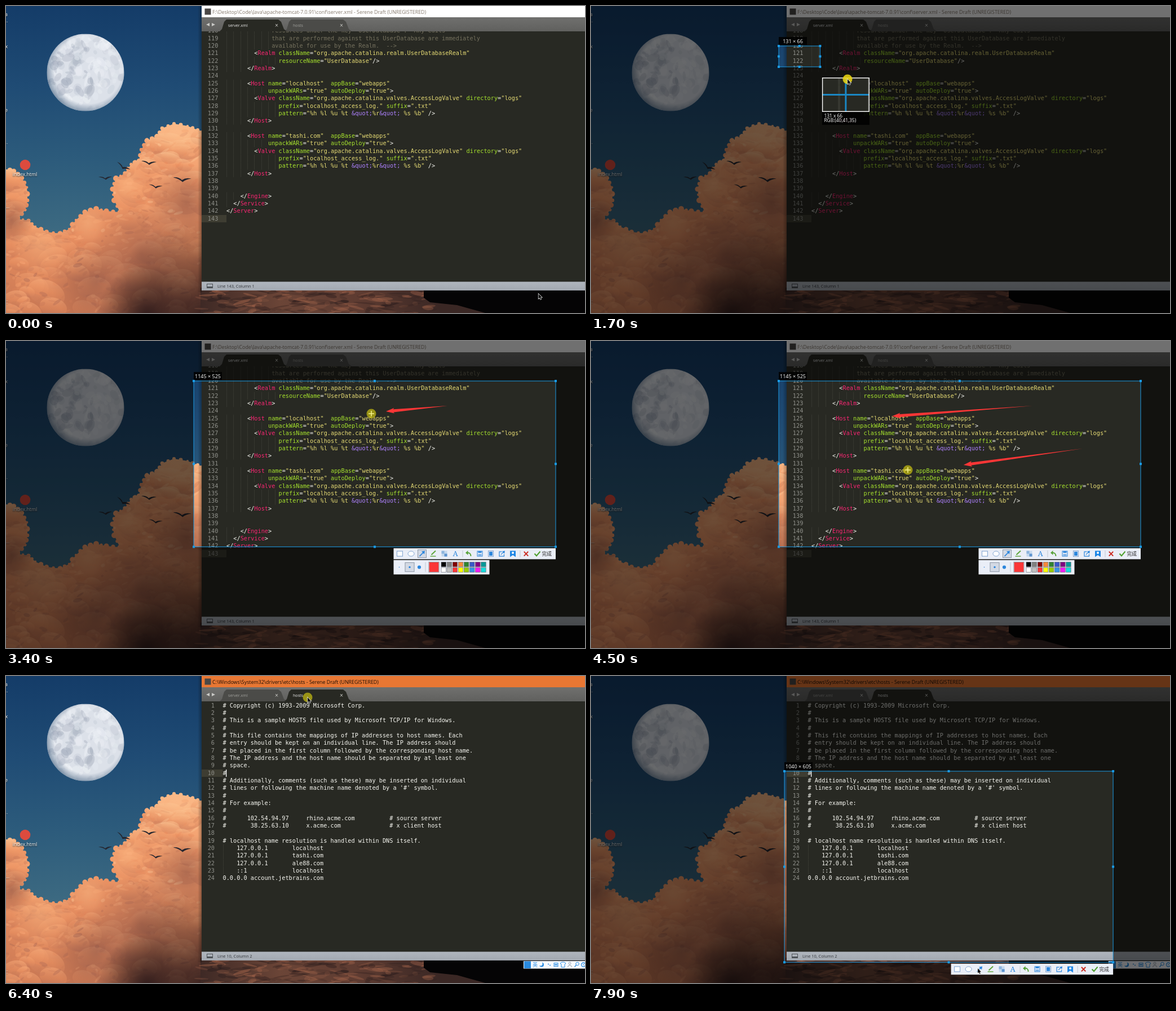
These frames come from a looping animation (1027x545 px, 8 s). An HTML page with a canvas:

```html
<!DOCTYPE html>
<html lang="en">
<head>
<meta charset="utf-8">
<title>Screen capture demo</title>
<style>
html, body { margin: 0; width: 100%; height: 100%; overflow: hidden; background: #000; }
canvas { display: block; width: 100%; height: 100%; }
</style>
</head>
<body>
<canvas id="stage" width="1027" height="545"></canvas>
<script>
const W = 1027, H = 545, LOOP = 8000, STEP = 100, SCALE = 0.5607;
const UI = '"Open Sans", "Noto Sans CJK SC", "Noto Sans CJK", sans-serif';
const MONO = '"DejaVu Sans Mono", "Noto Sans Mono", monospace';
const CW = 6.168, LH = 13.33, CODE = 10.245, BLUE = '#1a9be6', RED = '#fb3636';
const stage = document.getElementById('stage').getContext('2d');

let seed = 7;
const rnd = (a = 0, b = 1) => {
  seed = (seed * 16807) % 2147483647;
  return a + (b - a) * seed / 2147483647;
};

function rect(g, x, y, w, h, c) { g.fillStyle = c; g.fillRect(x, y, w, h); }
function box(g, x, y, w, h, c, lw = 1) { g.strokeStyle = c; g.lineWidth = lw; g.strokeRect(x, y, w, h); }
function disc(g, x, y, r, c) { g.fillStyle = c; g.beginPath(); g.arc(x, y, r, 0, 7); g.fill(); }
function blob(g, x, y, rx, ry, turn, c) {
  g.fillStyle = c;
  g.beginPath(); g.ellipse(x, y, rx, ry, turn, 0, 7); g.fill();
}
function trace(g, pts) {
  g.beginPath();
  for (let i = 0; i < pts.length; i += 2) g.lineTo(pts[i], pts[i + 1]);
}
function poly(g, pts, c) { trace(g, pts); g.closePath(); g.fillStyle = c; g.fill(); }
function line(g, pts, c, lw = 1) { trace(g, pts); g.strokeStyle = c; g.lineWidth = lw; g.stroke(); }
function text(g, s, x, y, size, c, font = UI, align = 'left') {
  g.font = size + 'px ' + font;
  g.textAlign = align;
  g.fillStyle = c;
  g.fillText(s, x, y);
}
function stops(grad, list) {
  list.forEach((c, i) => grad.addColorStop(i / (list.length - 1), c));
  return grad;
}
const ramp = (g, x0, y0, x1, y1, ...list) => stops(g.createLinearGradient(x0, y0, x1, y1), list);
function glow(g, x, y, r, rgb, a) {
  disc(g, x, y, r, stops(g.createRadialGradient(x, y, 0, x, y, r), [`rgba(${rgb},${a})`, `rgba(${rgb},${a / 2})`, `rgba(${rgb},0)`]));
}
function sheet() {
  const c = document.createElement('canvas');
  c.width = W; c.height = H;
  return c.getContext('2d', { willReadFrequently: true });
}

/* ---------- desktop ---------- */
function moon(g) {
  const x = 141, y = 118, r = 68.5;
  g.save();
  g.beginPath(); g.arc(x, y, r, 0, 7); g.clip();
  rect(g, x - r, y - r, 2 * r, 2 * r, '#dce1e9');
  for (let i = 0; i < 150; i++) {
    const a = rnd(0, 6.28), d = r * Math.sqrt(rnd());
    const px = x + d * Math.cos(a), py = y + d * Math.sin(a);
    const sea = px < x + 12 && py < y + 35 && py > y - 48;
    g.globalAlpha = rnd(0.15, 0.45);
    const c = sea && rnd() < 0.72 ? '#9fa8b8' : rnd() < 0.7 ? '#f0f3f7' : '#bfc6d1';
    blob(g, px, py, rnd(2, 12), rnd(2, 8), rnd(0, 3), c);
  }
  g.globalAlpha = 1;
  const edge = g.createRadialGradient(x + 5, y - 5, r - 8, x + 5, y - 5, r + 9);
  rect(g, x - r, y - r, 2 * r, 2 * r, stops(edge, ['rgba(90,112,140,0)', 'rgba(70,100,130,.7)']));
  g.restore();
}

const outlines = [
  [0, 290, 14, 293, 28, 305, 37, 322, 38, 345, 34, 362, 22, 376, 0, 382],
  [0, 374, 20, 378, 40, 381, 52, 392, 72, 401, 96, 404, 112, 396, 124, 380, 140, 366, 160, 360, 178, 364, 202, 366,
    192, 345, 189, 325, 195, 306, 211, 297, 222, 281, 236, 275, 240, 255, 250, 239, 268, 232, 277, 217, 298, 209,
    322, 213, 340, 220, 360, 225, 360, 545, 0, 545]
];

function clouds(g) {
  const p = new Path2D();
  for (const o of outlines) {
    p.moveTo(o[0], o[1]);
    for (let i = 2; i < o.length; i += 2) p.lineTo(o[i], o[i + 1]);
    p.closePath();
    for (let i = 2; i < o.length; i += 2) for (const k of [0, 0.5]) {
      const x = o[i] + (o[i - 2] - o[i]) * k, y = o[i + 1] + (o[i - 1] - o[i + 1]) * k, r = rnd(2, 5);
      p.moveTo(x + r, y);
      p.arc(x, y, r, 0, 7);
    }
  }
  g.save();
  g.clip(p);
  rect(g, 0, 200, 360, 345, ramp(g, 0, 210, 0, 545, '#fab685', '#f09a69', '#e28a5e', '#c87753'));
  for (let i = 0; i < 150; i++) {
    const y = 215 + i * 2.25, x = rnd(-10, 360), r = rnd(10, 28);
    g.globalAlpha = rnd(0.25, 0.55);
    const c = ramp(g, x + r * 0.3, y - r, x, y + r, y < 310 ? '#ffd3a2' : '#fbb07e', '#ec9362', '#bd7257');
    blob(g, x, y, r * 1.25, r * 0.85, rnd(-0.5, 0.5), c);
  }
  const tones = ['#ffcd9d', '#f9aa78', '#e98b5d', '#c97a58', '#ad6a55'];
  for (let i = 0; i < 700; i++) {
    const y = rnd(210, 545);
    g.globalAlpha = rnd(0.15, 0.45);
    blob(g, rnd(0, 350), y, rnd(2, 9), rnd(1, 3.5), rnd(-0.9, 0.5),
      tones[Math.min(4, Math.floor(rnd(0, 3.4) + (y - 210) / 230))]);
  }
  g.globalAlpha = 1;
  for (const [x, y, r] of [[320, 350, 70], [240, 440, 90], [160, 490, 80], [10, 380, 40]]) glow(g, x, y, r, '120,70,62', 0.5);
  for (const [x, y, r] of [[305, 230, 50], [215, 320, 35], [60, 425, 50], [145, 385, 35]]) glow(g, x, y, r, '255,196,142', 0.35);
  for (const [x, y, r] of [[350, 545, 170], [250, 550, 90]]) glow(g, x, y, r, '38,22,24', 0.9);
  g.restore();
}

function bird(g, x, y, s, tilt) {
  g.save();
  g.translate(x, y); g.rotate(tilt); g.scale(s, s);
  g.fillStyle = '#25262f';
  g.beginPath();
  g.moveTo(-13, -4);
  g.quadraticCurveTo(-5, -5, 0, 0);
  g.quadraticCurveTo(6, -4, 14, -2);
  g.quadraticCurveTo(6, -1, 1, 3);
  g.quadraticCurveTo(-4, -2, -13, -4);
  g.fill();
  g.restore();
}

function desktop(g) {
  rect(g, 0, 0, W, H, ramp(g, 0, 0, 0, 420, '#143c68', '#1f4b74', '#2d5c7c', '#3f6c82'));
  moon(g);
  clouds(g);
  [[176, 306, 0.9, -0.1], [207, 286, 1, 0.45], [253, 279, 1, 0], [265, 321, 0.9, 0.05], [312, 309, 1.2, 0]]
    .forEach(b => bird(g, ...b));
  rect(g, 345, 500, 682, 45, ramp(g, 345, 0, 770, 0, '#3e2925', '#6b4537', '#5d3b31', '#3a2724'));
  for (let i = 0; i < 160; i++) {
    g.globalAlpha = rnd(0.15, 0.45);
    blob(g, rnd(345, 760), rnd(505, 545), rnd(4, 20), rnd(1, 4), rnd(-0.3, 0.3), rnd() < 0.55 ? '#a9684d' : '#2a1c1c');
  }
  g.globalAlpha = 1;
  poly(g, [741, 505, 1027, 505, 1027, 545, 850, 545, 800, 531, 752, 526, 741, 518], '#050405');
  disc(g, 34, 282, 9.3, '#dd4b3e');
  g.shadowColor = '#000'; g.shadowBlur = 2; g.shadowOffsetY = 1;
  text(g, 'index.html', 33.5, 302, 8.8, '#fff', UI, 'center');
  [['a', 18], ['..', 29], ['x', 75], ['e', 188], ['..', 245], ['...', 359], [':', 528]]
    .forEach(([s, y]) => text(g, s, s === '...' ? 6 : 3, y, 8.8, '#fff', UI, 'right'));
  g.shadowColor = 'transparent'; g.shadowBlur = g.shadowOffsetY = 0;
}

/* ---------- editor ---------- */
const valve = [
  '        <Valve className="org.apache.catalina.valves.AccessLogValve" directory="logs"',
  '               prefix="localhost_access_log." suffix=".txt"',
  '               pattern="%h %l %u %t &quot;%r&quot; %s %b" />',
  '      </Host>'
];
const host = name => [
  `      <Host name="${name}"  appBase="webapps"`,
  '            unpackWARs="true" autoDeploy="true">', ...valve
];
const xml = [
  '             resources under the key "UserDatabase".  Any edits',
  '             that are performed against this UserDatabase are immediately',
  '             available for use by the Realm.  -->',
  '        <Realm className="org.apache.catalina.realm.UserDatabaseRealm"',
  '               resourceName="UserDatabase"/>',
  '      </Realm>', '', ...host('localhost'), '', ...host('tashi.com'), '', '',
  '    </Engine>', '  </Service>', '</Server>', ''
];
const hosts = `# Copyright (c) 1993-2009 Microsoft Corp.
#
# This is a sample HOSTS file used by Microsoft TCP/IP for Windows.
#
# This file contains the mappings of IP addresses to host names. Each
# entry should be kept on an individual line. The IP address should
# be placed in the first column followed by the corresponding host name.
# The IP address and the host name should be separated by at least one
# space.
#
# Additionally, comments (such as these) may be inserted on individual
# lines or following the machine name denoted by a '#' symbol.
#
# For example:
#
#      102.54.94.97     rhino.acme.com          # source server
#       38.25.63.10     x.acme.com              # x client host

# localhost name resolution is handled within DNS itself.
    127.0.0.1       localhost
    127.0.0.1       tashi.com
    127.0.0.1       ale88.com
    ::1             localhost
0.0.0.0 account.jetbrains.com`.split('\n');

function tokens(src) {
  const out = [];
  let tag = false;
  for (const m of src.matchAll(/"[^"]*"|<\/?|\/?>|=|\w+/g)) {
    const s = m[0];
    if (s[0] === '"') {
      let at = m.index;
      for (const part of s.split(/(&quot;)/)) {
        out.push([part, at, part[0] === '&' ? '#ae81ff' : '#e6db74']);
        at += part.length;
      }
    } else {
      const word = /\w/.test(s);
      out.push([s, m.index, !word ? '#f8f8f2' : tag ? '#f92672' : '#a6e22e']);
    }
    tag = s[0] === '<';
  }
  return out;
}

function code(g, rows, o) {
  rows.forEach((row, i) => {
    const y = o.y + i * LH, n = o.first + i;
    if (n === o.current) rect(g, 347, Math.round(y - 10), o.x - 347, 13, '#3e3d32');
    text(g, n, o.num, y, CODE, '#90918b', MONO, 'right');
    const indent = row.search(/\S/);
    for (let c = 0; c < indent; c += o.tab) rect(g, Math.round(o.x + c * CW), y - 10, 1, LH, '#363730');
    const list = !o.xml ? [[row, 0, '#f8f8f2']] : i < 3 ? [[row.trim(), indent, '#75715e']] : tokens(row);
    for (const [s, col, c] of list) text(g, s, o.x + col * CW, y, CODE, c, MONO);
  });
}

function tab(g, x, name, on) {
  poly(g, [x, 45, x + 4, 41, x + 8, 28, x + 12, 24, x + 104, 24, x + 109, 28, x + 114, 41, x + 119, 45],
    on ? '#282923' : '#4b4b48');
  text(g, name, x + 15, 37, 7.1, on ? '#f0f0f0' : '#a2a29e');
  const c = x + 101;
  line(g, [c - 2, 32, c + 2, 36.5], '#c8c8c4');
  line(g, [c + 2, 32, c - 2, 36.5], '#c8c8c4');
}

function editor(g, isHosts) {
  rect(g, 340, 0, 7, 508, ramp(g, 340, 0, 347, 0, 'rgba(0,0,0,0)', 'rgba(0,0,0,.3)'));
  rect(g, 347, 0, 680, 505, '#282923');
  g.save();
  g.beginPath(); g.rect(347, 45, 680, 444); g.clip();
  if (isHosts) {
    code(g, hosts, { x: 384.5, y: 55.6, num: 370, first: 1, current: 10, tab: 4 });
    rect(g, 390, 166, 1.3, 13, '#fff');
  } else {
    code(g, xml, { x: 391, y: 47.3, num: 376.3, first: 118, current: 143, tab: 2, xml: true });
  }
  g.restore();
  rect(g, 347, 0, 680, 20, isHosts ? '#e87733' : '#fff');
  rect(g, 352.5, 4.5, 11, 11, '#4b4846');
  const path = isHosts ? 'C:\\Windows\\System32\\drivers\\etc\\hosts'
    : 'F:\\Desktop\\Code\\Java\\apache-tomcat-7.0.91\\conf\\server.xml';
  text(g, path + ' - Serene Draft (UNREGISTERED)', 366, 13.5, 8.84, isHosts ? '#1c0d04' : '#85796d');
  rect(g, 347, 20, 680, 25, ramp(g, 0, 20, 0, 45, '#70706e', '#60605e'));
  poly(g, [361, 30, 361, 36, 355, 33], '#c9c9c6');
  poly(g, [365, 30, 365, 36, 371, 33], '#c9c9c6');
  tab(g, isHosts ? 379 : 494, isHosts ? 'server.xml' : 'hosts', false);
  tab(g, isHosts ? 494 : 379, isHosts ? 'hosts' : 'server.xml', true);
  rect(g, 347, 489.5, 680, 15.5, ramp(g, 0, 489, 0, 505, '#b0b6be', '#a2a8b0'));
  box(g, 356.5, 493.5, 10, 7, '#4d5257');
  rect(g, 357, 498, 9, 2, '#4d5257');
  text(g, isHosts ? 'Line 10, Column 2' : 'Line 143, Column 1', 375, 500, 7.4, '#33373b');
}

function inputBar(g) {
  const c = '#2a8be0', y = 512.5;
  rect(g, 918, 506, 109, 13.5, '#f6faff');
  rect(g, 919, 506.5, 12, 12.5, c);
  text(g, '英', 934, 516, 9, c);
  disc(g, 950, y, 4, c);
  disc(g, 948, y - 1.5, 3.6, '#f6faff');
  disc(g, 962, y - 1, 1, c); disc(g, 965, y + 1, 1, c);
  box(g, 972, y - 3, 7, 6, c);
  line(g, [973, y, 978, y], c, 2);
  line(g, [983, 510, 986, 508, 990, 508, 993, 510, 991, 512, 991, 517, 985, 517, 985, 512, 983, 510], c);
  g.strokeStyle = '#98a2ae';
  g.beginPath(); g.arc(1000, 510, 2, 0, 7); g.stroke();
  g.beginPath(); g.arc(1000, 517, 3.5, 3.14, 6.28); g.stroke();
  g.strokeStyle = c;
  g.beginPath(); g.arc(1013.5, 511, 2.8, 0, 7); g.stroke();
  line(g, [1011.5, 513, 1008.5, 516.5], c, 1.3);
  g.beginPath(); g.arc(1024, y, 3.5, 0, 7); g.stroke();
  disc(g, 1024, y, 1, c);
}

/* ---------- capture tool ---------- */
function handle(g, x, y) { rect(g, x - 2, y - 2, 4, 4, BLUE); }

function selection(g, base, s, x, y) {
  const w = x - s.x, h = y - s.y;
  if (w < 1 || h < 1) return;
  g.save();
  g.beginPath(); g.rect(s.x, s.y, w, h); g.clip();
  g.drawImage(base.canvas, 0, 0);
  g.restore();
  box(g, s.x, s.y, w, h, BLUE);
  for (const i of [0, 0.5, 1]) for (const j of [0, 0.5, 1])
    if (i !== 0.5 || j !== 0.5) handle(g, s.x + w * i, s.y + h * j);
  rect(g, s.x, s.y - 16, 50, 14, 'rgba(0,0,0,.85)');
  text(g, `${Math.round(w / SCALE)} × ${Math.round(h / SCALE)}`, s.x + 25, s.y - 5.5, 9, '#fff', UI, 'center');
}

function magnifier(g, base, s, x, y) {
  const mx = x + 3.5, my = y + 104 > 605 ? y - 104 : y + 19, w = 84, h = 61, zoom = 4;
  rect(g, mx, my, w, h + 23, 'rgba(0,0,0,.85)');
  g.save();
  g.beginPath(); g.rect(mx, my, w, h); g.clip();
  rect(g, mx, my, w, h, '#000');
  g.imageSmoothingEnabled = false;
  g.translate(mx + w / 2, my + h / 2);
  g.scale(zoom, zoom);
  g.drawImage(base.canvas, -x, -y);
  g.restore();
  rect(g, mx, my + h / 2 - 1.5, w, 3, '#1a87c3');
  rect(g, mx + w / 2 - 1.5, my, 3, h, '#1a87c3');
  box(g, mx + 0.7, my + 0.7, w - 1.4, h - 1.4, '#fff', 1.4);
  const px = base.getImageData(Math.floor(x), Math.floor(y), 1, 1).data;
  text(g, `${Math.round((x - s.x) / SCALE)} x ${Math.round((y - s.y) / SCALE)}`, mx + 3.5, my + 71, 8.4, '#fff');
  text(g, `RGB:(${px[0]},${px[1]},${px[2]})`, mx + 3.5, my + 78.5, 8.4, '#fff');
}

function toolbar(g, x, y, tool, hover) {
  const m = y + 9.7, c = '#2c86dc', frame = '#8f9aa8';
  const at = (dx, draw) => { g.save(); g.translate(x + dx, m); draw(); g.restore(); };
  const chip = () => { rect(g, -8, -7.5, 16, 15, '#d3d9e4'); box(g, -7.5, -7, 15, 14, frame); };
  rect(g, x, y, 287.5, 19.5, '#eaeef7');
  at(11, () => { rect(g, -5, -4, 10, 8, '#fff'); box(g, -5, -4.5, 10, 9, '#7fa3d0'); });
  at(31, () => { blob(g, 0, 0, 5.5, 4.5, 0, '#fff'); g.strokeStyle = '#7fa3d0'; g.stroke(); });
  at(50.5, () => {
    if (tool) chip();
    line(g, [-4.5, 4.5, 3, -3], c, 1.6);
    poly(g, [5, -5, 4, 1, -1, -4], c);
  });
  at(70, () => { line(g, [-3, 2, 4.5, -5], '#5fa63c', 2); line(g, [-5, 4.5, 5, 4.5], '#5fa63c', 1.4); });
  at(90, () => {
    rect(g, -5, -5, 10, 10, '#c3d8ee');
    rect(g, -5, -5, 5, 5, '#8db4dc');
    rect(g, 0, 0, 5, 5, '#5d94cf');
  });
  at(109.5, () => text(g, 'A', 0, 4.8, 13, c, '"Noto Serif", serif', 'center'));
  at(133, () => {
    g.strokeStyle = '#58a23a'; g.lineWidth = 1.9;
    g.beginPath(); g.moveTo(-3, -1.5); g.quadraticCurveTo(4, -2.5, 4, 4.5); g.stroke();
    poly(g, [-5.5, -1.5, -1, -5.5, -1, 2.5], '#58a23a');
  });
  at(153, () => {
    box(g, -4.5, -4.5, 9, 9, c);
    rect(g, -3, -4.5, 6, 3, c);
    rect(g, -3, 0.5, 6, 4, '#7fb2e6');
  });
  at(172.5, () => { box(g, -4.5, -5, 9, 10, '#7fa3d0'); rect(g, -3, -3.5, 6, 7, c); });
  at(192, () => {
    line(g, [0, -3.5, -4.5, -3.5, -4.5, 4.5, 4, 4.5, 4, 1], c, 1.2);
    line(g, [-1.5, 1.5, 3, -3], c, 1.2);
    poly(g, [5.5, -5, 4.5, 0, 0.5, -4], c);
  });
  at(211.5, () => { poly(g, [-5, -5, 5, -5, 5, 6, 0, 2.5, -5, 6], '#1e86e5'); disc(g, 0, -1.5, 2, '#fff'); });
  at(235, () => {
    if (hover) chip();
    line(g, [-3.7, -3.7, 3.7, 4], '#cb2c22', 2);
    line(g, [3.7, -3.7, -3.7, 4], '#cb2c22', 2);
  });
  at(255, () => line(g, [-5, 0, -1.5, 3.8, 5, -4], '#4f9f30', 2.2));
  text(g, '完成', x + 263, m + 3.2, 8.7, '#222');
  for (const dx of [122, 224]) rect(g, x + dx, y + 4, 1, 12, '#c0c7d2');
}

const swatches = ['#000', '#808080', '#800000', '#f7883a', '#308430', '#3858c8', '#800080', '#009898',
  '#fff', '#c0c0c0', '#fb3838', '#ffff00', '#99cc00', '#3894e4', '#f31bf3', '#16dcdc'];

function styleBar(g, x, y) {
  rect(g, x, y, 170, 25.5, '#eaeef7');
  rect(g, x + 20, y + 4, 17, 17, '#d3d9e4');
  box(g, x + 20.5, y + 4.5, 16, 16, '#8f9aa8');
  [[10, 0.8], [28.5, 1.7], [45.5, 3.1]].forEach(([dx, r]) => disc(g, x + dx, y + 12.6, r, '#2c86dc'));
  rect(g, x + 56, y + 4, 1, 17, '#c0c7d2');
  rect(g, x + 63, y + 4, 17, 17, RED);
  box(g, x + 62.5, y + 3.5, 18, 18, '#8f8f96');
  swatches.forEach((c, i) => {
    const sx = x + 84.5 + (i % 8) * 10.1, sy = y + 3.5 + (i >> 3) * 9.7;
    rect(g, sx, sy, 8.5, 8.5, c);
    box(g, sx, sy, 8.5, 8.5, '#70747c', 0.7);
  });
}

function arrow(g, x0, y0, x1, y1) {
  const len = Math.hypot(x1 - x0, y1 - y0);
  if (len < 4) return;
  const head = Math.min(15, len * 0.5), k = head / 15;
  g.save();
  g.translate(x1, y1);
  g.rotate(Math.atan2(y0 - y1, x0 - x1));
  poly(g, [0, 0, head, -5 * k, head - 2, -2.6 * k, len, 0, head - 2, 2.6 * k, head, 5 * k], RED);
  g.restore();
}

/* ---------- pointer ---------- */
const keys = [
  [0, 944.5, 511], [900, 591, 230], [1500, 333, 71], [1600, 406.4, 108], [1700, 455, 130], [1800, 560, 190],
  [1900, 690, 265], [2000, 810, 328], [2100, 898, 361], [2200, 975, 365.4], [2300, 975, 365.4], [2700, 738, 377],
  [2900, 740, 376], [3100, 783, 115], [3200, 735, 120], [3300, 674, 125], [3400, 648, 129], [3600, 542, 133],
  [3700, 534, 133.5], [3800, 534, 133.5], [4200, 872, 191], [4500, 562, 229], [4600, 536, 232], [4700, 536, 232],
  [5300, 926, 377], [5800, 928, 378], [6300, 535, 38], [6600, 535, 38], [7000, 343, 169], [7100, 362.6, 177.4],
  [7200, 402, 199], [7300, 520, 270], [7400, 700, 380], [7500, 920, 505], [7600, 926.1, 508.2],
  [7700, 926.1, 508.2], [7900, 686, 519]
];
const presses = [[1500, 2300], [2800, 2900], [3100, 3800], [4200, 4700], [5800, 5900], [6400, 6500], [7000, 7700]];

// Monotone cubic: the hand slows down at turns and never overshoots.
const pace = (i, a) => i < 1 || i >= keys.length ? 0 : (keys[i][a] - keys[i - 1][a]) / (keys[i][0] - keys[i - 1][0]);
function speed(i, a) {
  const p = pace(i, a), q = pace(i + 1, a);
  return p * q > 0 ? 2 * p * q / (p + q) : 0;
}
function pos(t) {
  let i = 1;
  while (i < keys.length - 1 && keys[i][0] < t) i++;
  const dt = keys[i][0] - keys[i - 1][0], k = Math.min(1, (t - keys[i - 1][0]) / dt);
  return [1, 2].map(a => {
    const from = keys[i - 1][a], to = keys[i][a];
    return from + (to - from) * k * k * (3 - 2 * k)
      + dt * k * (1 - k) * (speed(i - 1, a) * (1 - k) - speed(i, a) * k);
  });
}

function pointer(g, t) {
  const [x, y] = pos(t);
  const press = presses.find(p => t >= p[0] && t < p[1]);
  if (press) {
    const drag = shots.some(s => s.press === press[0]);
    disc(g, x, y, 8.5, drag ? 'rgba(236,214,16,.86)' : 'rgba(214,204,16,.65)');
  }
  if (t >= 2900 && t < 5300 && y < 365) {
    line(g, [x - 5, y, x + 5, y], '#f4f08a', 1.6);
    line(g, [x, y - 5, x, y + 5], '#f4f08a', 1.6);
    return;
  }
  g.save();
  g.translate(x, y);
  trace(g, [0, 0, 0, 8.6, 2, 6.9, 3.4, 10, 4.8, 9.4, 3.5, 6.4, 6.1, 6.2]);
  g.closePath();
  g.strokeStyle = '#fff'; g.lineWidth = 1.3; g.stroke();
  g.fillStyle = '#0c0c0c'; g.fill();
  g.restore();
}

/* ---------- timeline ---------- */
const shots = [
  { on: 1400, press: 1500, done: 2300, off: 5900, x: 333, y: 71, x1: 975, y1: 365.4 },
  { on: 6900, press: 7000, done: 7700, off: LOOP, x: 343, y: 169, x1: 926.1, y1: 508.2 }
];
const strokes = [[3100, 3800, 783, 115], [4200, 4700, 872, 191]];

const wall = sheet();
desktop(wall);
const screens = [false, true].map(isHosts => {
  const g = sheet();
  g.drawImage(wall.canvas, 0, 0);
  editor(g, isHosts);
  if (isHosts) inputBar(g);
  return g;
});

function draw(t) {
  const g = stage, base = screens[t >= 6400 ? 1 : 0];
  g.drawImage(base.canvas, 0, 0);
  const s = shots.find(s => t >= s.on && t < s.off);
  if (s) {
    rect(g, 0, 0, W, H, 'rgba(0,0,0,.56)');
    if (t >= s.done) {
      const x = s.x1 - 287.5, y = s.y1 + 2.5, tool = t >= 2800 && t < 5900;
      selection(g, base, s, s.x1, s.y1);
      for (const [from, to, x0, y0] of strokes)
        if (t > from && t < 5900) arrow(g, x0, y0, ...pos(Math.min(t, to) - STEP));
      toolbar(g, x, y, tool, t >= 5300 && t < 5900);
      if (tool) styleBar(g, x, y + 21);
    } else if (t > s.press) {
      const [x, y] = pos(t - STEP);
      selection(g, base, s, x, y);
      if (x > s.x) magnifier(g, base, s, x, y);
    }
  }
  pointer(g, t);
}

const start = performance.now();
function tick() {
  const t = (performance.now() - start) % LOOP;
  draw(Math.floor(t / STEP) * STEP);
  requestAnimationFrame(tick);
}
tick();
</script>
</body>
</html>
```
